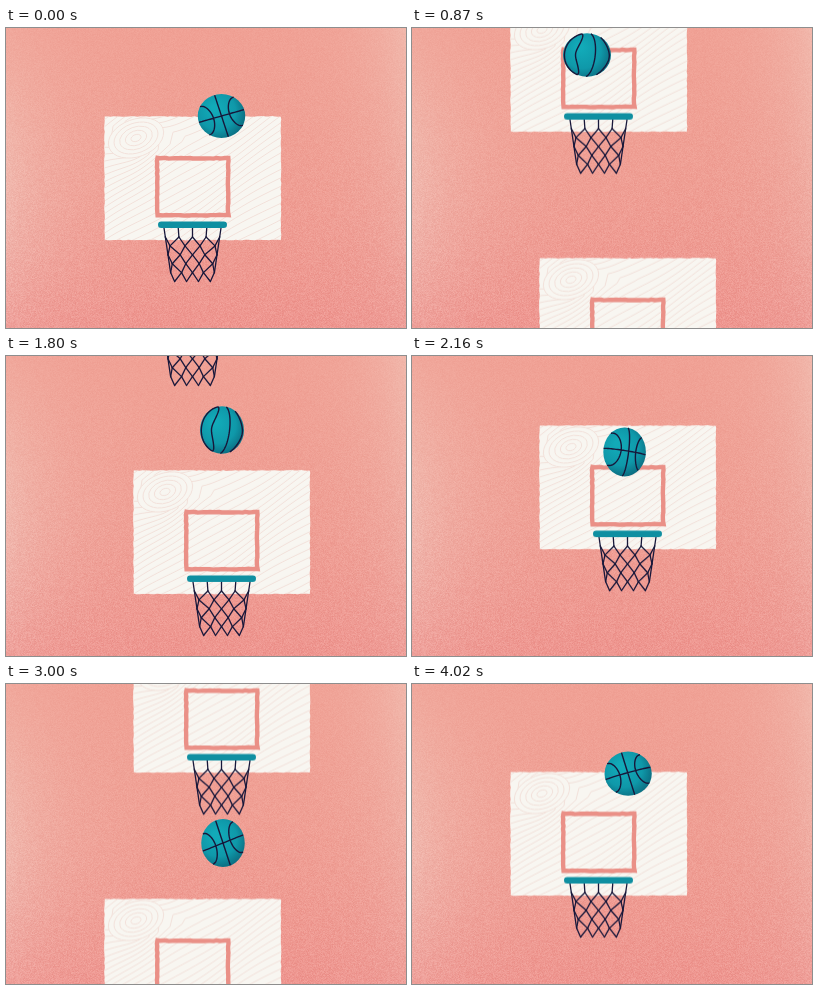
Animation, 400 px wide and 300 px high, one loop 4.05 s. Source, as an HTML page with a canvas:

```html
<!DOCTYPE html>
<html lang="en">
<head>
<meta charset="utf-8">
<title>Basketball loop</title>
<style>
html, body { margin: 0; height: 100%; overflow: hidden; background: #ee9a90; }
canvas { display: block; width: 100vw; height: 100vh; }
</style>
</head>
<body>
<canvas id="stage" width="400" height="300"></canvas>
<script>
const W = 400, H = 300, LOOP = 4050, SPEED = 0.1245, GAP = 250;
const TEAL = '#0f8fa1', INK = '#17173a', PAPER = '#f8f6f1', PINK = '#ea9087';
const TAU = Math.PI * 2, RAD = Math.PI / 180;
const ctx = document.getElementById('stage').getContext('2d');

let seed = 7;
const rand = () => (seed = (seed * 16807) % 2147483647) / 2147483647;

function layer(w, h, paint) {
  const c = document.createElement('canvas');
  c.width = w;
  c.height = h;
  paint(c.getContext('2d'));
  return c;
}

function trace(g, points) {
  g.beginPath();
  for (const [x, y] of points) g.lineTo(x, y);
}

// Rectangle outline with a slightly hand-cut edge
function roughRect(x, y, w, h) {
  const points = [], wob = () => (rand() - 0.5) * 0.8;
  const side = (x0, y0, x1, y1) => {
    const n = Math.round(Math.hypot(x1 - x0, y1 - y0) / 3);
    for (let i = 0; i < n; i++) {
      points.push([x0 + (x1 - x0) * i / n + wob(), y0 + (y1 - y0) * i / n + wob()]);
    }
  };
  side(x, y, x + w, y);
  side(x + w, y, x + w, y + h);
  side(x + w, y + h, x, y + h);
  side(x, y + h, x, y);
  return points;
}

const wall = layer(W, H, g => {
  const img = g.createImageData(W, H);
  for (let i = 0; i < W * H; i++) {
    const x = i % W, y = i / W / H;
    const left = 26 * Math.exp(-x / 60 - ((y - 0.55) / 0.5) ** 2);
    const right = 24 * Math.exp((x - W) / 40) * (1 - 0.6 * y);
    const glow = left + right;
    const grain = (rand() + rand() - 1) * (5 + 9 * y);
    img.data.set([
      240 - 2 * y + glow * 0.05 + grain * 0.4,
      160 - 11 * y * y + glow + grain,
      148 - 5 * y * y + glow + grain,
      255
    ], i * 4);
  }
  g.putImageData(img, 0, 0);
});

const board = layer(180, 128, g => {
  g.translate(1, 1);
  trace(g, roughRect(0.5, 0.5, 176.5, 123.5));
  g.fillStyle = PAPER;
  g.fill();
  g.clip();

  // Wood: diagonal lines bending around the rings of a knot
  g.strokeStyle = '#f2dfd9';
  g.lineWidth = 0.9;
  const kx = 32, ky = 22;
  for (let k = 0; k < 32; k++) {
    const line = [];
    for (let x = -3; x <= 180; x += 3) {
      const y = k * 7.5 - 0.62 * x + 4 * Math.sin(x / 27 + k * 0.25);
      const d = y - ky;
      const push = 18 * Math.exp(-(((x - kx) / 32) ** 2) - Math.abs(d) / 38);
      line.push([x, y + (d < 0 ? -push : push)]);
    }
    trace(g, line);
    g.stroke();
  }
  for (let r = 22; r > 2; r -= 4.5) {
    g.beginPath();
    g.ellipse(kx, ky, r * 1.3, r * 0.85, -0.35, 0, TAU);
    g.fill();
    g.stroke();
  }

  trace(g, roughRect(53.2, 42.2, 71, 57));
  g.closePath();
  g.strokeStyle = PINK;
  g.lineWidth = 4.4;
  g.stroke();
});

const hoop = layer(180, 172, g => {
  g.translate(1, 1);
  g.lineCap = g.lineJoin = 'round';
  g.strokeStyle = INK;
  g.lineWidth = 1.3;
  // Rows of five and four knots alternate; the rows of four spread a little wider
  const row = r => 121 + r * 8.9;
  const node = (j, y) => [88.5 + (j / 4 - 1) * (j % 2 ? 1.16 : 1) * (28.5 - 8 * (y - 112) / 54), y];
  const string = (...points) => { trace(g, points); g.stroke(); };
  for (let j = 0; j <= 8; j += 2) string(node(j, 111), node(j, row(0)));
  for (let r = 0; r < 5; r++) {
    for (let j = r % 2; j <= 8; j += 2) {
      for (const to of [j - 1, j + 1]) {
        if (to >= 0 && to <= 8) string(node(j, row(r)), node(to, row(r + 1)));
      }
    }
  }
  for (const j of [0, 8]) string(node(j, row(0)), node(j, row(4)));

  g.strokeStyle = TEAL;
  g.lineWidth = 6.6;
  string([57.3, 108.8], [119.7, 108.8]);
});

// Ball: time, x, y, width, spin, roll, yaw
const keys = [
  [0, 215.5, 88, 47.5, 0, -17, 0],
  [540, 191, 47, 47.5, 52, 0, 8],
  [870, 175, 27, 48, 90, 6, 20],
  [1110, 182, 58, 43, 135, 10, 20],
  [1360, 188, 81, 41, 185, 10, 18],
  [1800, 216, 74, 44, 270, 8, 20],
  [2250, 211, 104, 42, 380, 8, 8],
  [2490, 207.5, 138, 40, 450, 5, 0],
  [2750, 213, 159, 41, 495, -8, 0],
  [3000, 217, 159, 43.5, 540, -20, 0],
  [3600, 215.5, 119, 41, 675, 8, 0],
  [LOOP, 215.5, 87.5, 47.5, 720, -17, 0]
];
const shift = (key, n) => key.map((v, i) => v + n * (i === 0 ? LOOP : i === 4 ? 720 : 0));
const path = [shift(keys[keys.length - 2], -1), ...keys, shift(keys[1], 1)];

function pose(t) {
  let i = 1;
  while (i < path.length - 3 && path[i + 1][0] <= t) i++;
  const [p, a, b, n] = path.slice(i - 1, i + 3);
  const span = b[0] - a[0], u = (t - a[0]) / span;
  return a.map((v, c) => {
    const m0 = (b[c] - p[c]) / (b[0] - p[0]) * span;
    const m1 = (n[c] - v) / (n[0] - a[0]) * span;
    const d = b[c] - v;
    return v + u * (m0 + u * (3 * d - 2 * m0 - m1 + u * (m0 + m1 - 2 * d)));
  });
}

const turn = (a, b, deg) => {
  const c = Math.cos(deg * RAD), s = Math.sin(deg * RAD);
  return [a * c + b * s, b * c - a * s];
};

const sideSeam = sign => a => {
  const x = 0.55 - 0.2 * Math.cos(2 * a), r = Math.sqrt(1 - x * x);
  return [sign * x, r * Math.sin(a), r * Math.cos(a)];
};
const seams = [
  a => [0, Math.sin(a), Math.cos(a)],
  a => [Math.sin(a), 0, Math.cos(a)],
  sideSeam(1),
  sideSeam(-1)
];

function drawBall(t) {
  const [, cx, cy, w, spin, roll, yaw] = pose(t);
  const rx = w / 2, ry = (91.5 - w) / 2;
  ctx.save();
  ctx.translate(cx, cy);
  ctx.beginPath();
  ctx.ellipse(0, 0, rx, ry, 0, 0, TAU);
  const shade = ctx.createRadialGradient(-7, -8, 3, -3, -3, 29);
  shade.addColorStop(0, '#12aab8');
  shade.addColorStop(0.6, '#0f98a9');
  shade.addColorStop(1, '#0b687c');
  ctx.fillStyle = shade;
  ctx.fill();

  ctx.beginPath();
  for (const seam of seams) {
    let visible = false;
    for (let a = 0; a <= 72; a++) {
      let [x, y, z] = seam(a / 72 * TAU);
      [y, z] = turn(y, z, spin);
      [x, z] = turn(x, z, yaw);
      [y, x] = turn(y, x, roll);
      const front = z > 0.1;
      if (front) ctx[visible ? 'lineTo' : 'moveTo'](x * rx, y * ry);
      visible = front;
    }
  }
  ctx.strokeStyle = INK;
  ctx.lineWidth = 1.4;
  ctx.stroke();
  ctx.restore();
}

// Poses are held for 60 ms; the last one before each beat absorbs the rest
const beats = [0, 30, 540, 870, 960, 1800, 1890, 2160, 2490, 2760, 3090, 3360, 3690, 3960, LOOP + 30];
function hold(t) {
  const i = beats.findIndex(b => b > t) - 1;
  const start = beats[i];
  const last = Math.max(0, Math.floor((beats[i + 1] - start) / 60) - 1);
  return start + 60 * Math.min(last, Math.floor((t - start) / 60));
}

function draw(t) {
  // A basket is dropped once only the tips of its net are left on stage
  const spots = [0, 1, 2]
    .map(k => [k % 2 ? 126 : 97, 87 + k * GAP - t * SPEED])
    .filter(([, y]) => y > -160);
  ctx.drawImage(wall, 0, 0);
  for (const spot of spots) ctx.drawImage(board, ...spot);
  drawBall(t);
  for (const spot of spots) ctx.drawImage(hoop, ...spot);
}

const begin = performance.now();
function tick() {
  draw(hold((performance.now() - begin) % LOOP));
  requestAnimationFrame(tick);
}
tick();
</script>
</body>
</html>
```
